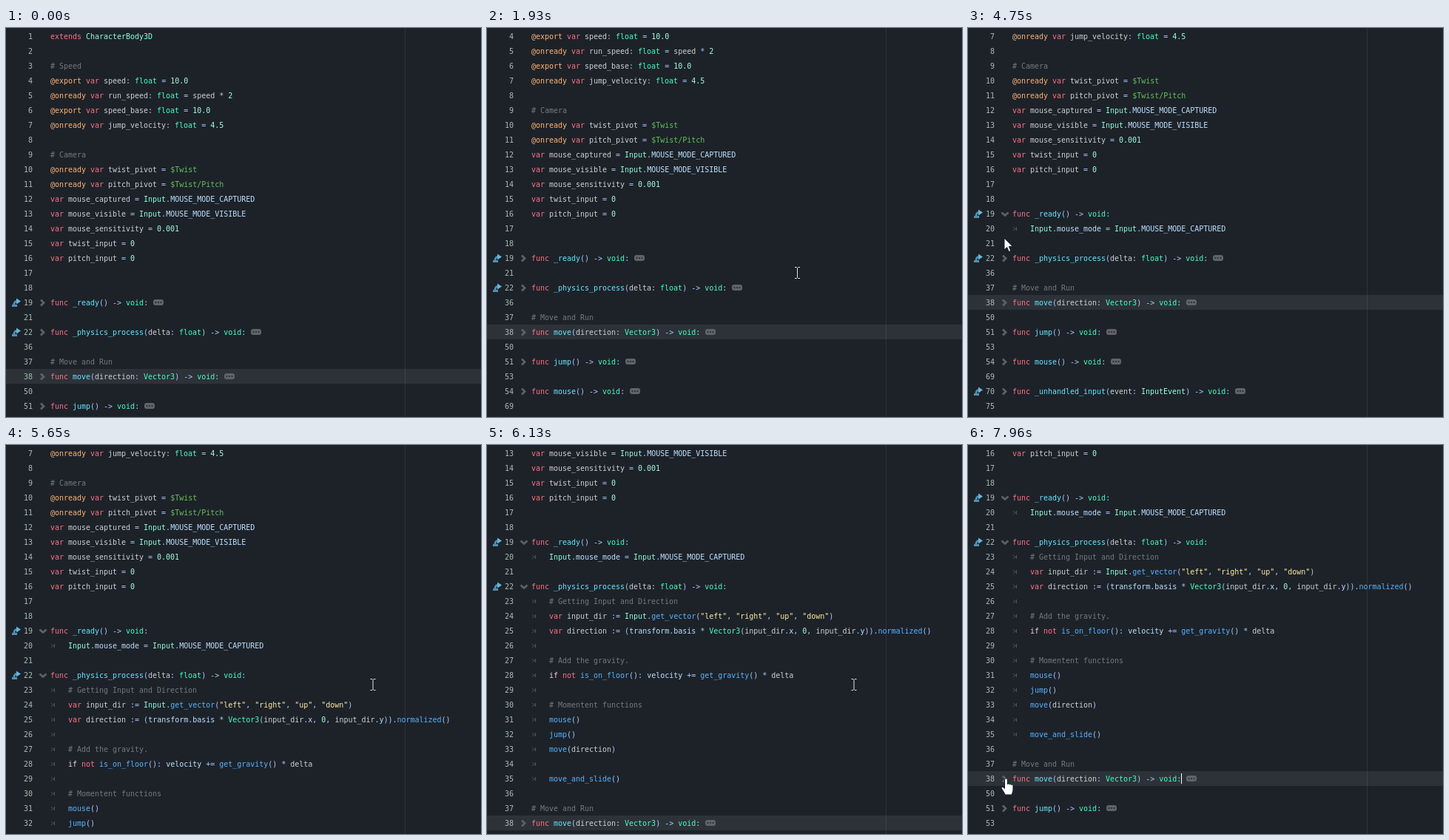
Recreate the animation shown at these times as an HTML page. Size 642 px wide and 526 px high, loop 8000 ms.

```html
<!DOCTYPE html>
<html lang="en">
<head>
<meta charset="utf-8">
<title>Code folding</title>
<style>
html, body { margin: 0; width: 100%; height: 100%; overflow: hidden; background: #1d2229; }
svg { display: block; width: 642px; height: 526px; }
text { font: 10px "DejaVu Sans Mono", "Noto Sans Mono", monospace; letter-spacing: -.02px; white-space: pre; }
path { fill: none; }
.num { fill: #a9bdb0; text-anchor: end; }
.fold { stroke: #5d6166; stroke-width: 2.8; }
.tab { stroke: #4b5057; }
.pill { fill: #606469; }
.dots { stroke: #23282f; stroke-width: 2; stroke-linecap: round; stroke-dasharray: 0 3.5; }
.link { stroke: #4f8fb3; stroke-width: 2.8; }
.head { fill: #68b4da; }
.pointer path { stroke: #14171c; fill: #fff; stroke-linejoin: round; }
.pointer .edge { stroke-width: 2.6; fill: none; }
.pointer .bar { stroke: #eee; fill: none; }
</style>
</head>
<body>
<svg viewBox="0 0 642 526">
  <rect width="642" height="526" fill="#1d2229"/>
  <path d="M539.5 0V526" stroke="#2d3239"/>
  <g id="code"></g>
  <g id="beam" class="pointer">
    <path class="edge" d="M-3.5-7.5H-1L0-6.5 1-7.5H3.5M0-6.5V6.5M-3.5 7.5H-1L0 6.5 1 7.5H3.5"/>
    <path class="bar" d="M-3.5-7.5H-1L0-6.5 1-7.5H3.5M0-6.5V6.5M-3.5 7.5H-1L0 6.5 1 7.5H3.5"/>
  </g>
  <g id="arrow" class="pointer"><path d="M0 0V16L3.7 12.6 6.2 18.4 8.8 17.3 6.4 11.6H11.4Z"/></g>
  <g id="hand" class="pointer">
    <path d="M-2 2C-2-.6 2-.6 2 2V8C2 6.5 5 6.5 5 8.3 5 6.8 7.4 7.1 7.4 8.8 7.4 7.5 9.5 7.8 9.5 9.6V15C9.5 18 8 19 8 22H-1.5C-1.5 20-5 16-6 13.5-6.7 11.5-4.4 10.7-3 12.7L-2 13.5Z"/>
  </g>
</svg>
<script>
const LOOP = 8000, ROW = 20, COL = 6, LEFT = 60, STEP = 68;

const source = `1 extends CharacterBody3D
2
3 # Speed
4 @export var speed: float = 10.0
5 @onready var run_speed: float = speed * 2
6 @export var speed_base: float = 10.0
7 @onready var jump_velocity: float = 4.5
8
9 # Camera
10 @onready var twist_pivot = $Twist
11 @onready var pitch_pivot = $Twist/Pitch
12 var mouse_captured = Input.MOUSE_MODE_CAPTURED
13 var mouse_visible = Input.MOUSE_MODE_VISIBLE
14 var mouse_sensitivity = 0.001
15 var twist_input = 0
16 var pitch_input = 0
17
18
19 func _ready() -> void:
20     Input.mouse_mode = Input.MOUSE_MODE_CAPTURED
21
22 func _physics_process(delta: float) -> void:
23     # Getting Input and Direction
24     var input_dir := Input.get_vector("left", "right", "up", "down")
25     var direction := (transform.basis * Vector3(input_dir.x, 0, input_dir.y)).normalized()
26     ${""}
27     # Add the gravity.
28     if not is_on_floor(): velocity += get_gravity() * delta
29     ${""}
30     # Momentent functions
31     mouse()
32     jump()
33     move(direction)
34     ${""}
35     move_and_slide()
36
37 # Move and Run
38 func move(direction: Vector3) -> void:
50
51 func jump() -> void:
53
54 func mouse() -> void:
69
70 func _unhandled_input(event: InputEvent) -> void:
75`;

const syntax = [
  [/#.*/, "#75797e"],
  [/"[^"]*"/, "#ffeda1"],
  [/@\w+/, "#ffb373"],
  [/\$[\w/]+/, "#63c259"],
  [/\b\d[\d.]*/, "#a1ffe0"],
  [/\b(?:extends|var|func|not)\b/, "#ff7085"],
  [/\bif\b/, "#f0cfd0"],
  [/\b(?:float|void|Vector3)\b/, "#42ffc2"],
  [/\b(?:CharacterBody3D|InputEvent|Input)\b/, "#8fffdb"],
  [/(?<=func )\w+/, "#66e6ff"],
  [/\b\w+(?=\()/, "#57b3ff"],
  [/(?<=\.)\w+|\b(?:transform|velocity)\b/, "#bce0ff"],
  [/\w+/, "#cdcfd2"],
  [/[^\w\s"#@$]+/, "#abc9ff"]
];
const lexer = new RegExp(syntax.map(([re]) => `(${re.source})`).join("|"), "g");

// When a clicked function unfolds
const opens = { 19: 3820, 22: 5090 };
const wheel = [
  { at: 1860, lines: 3, steps: 2 },
  { at: 2200, lines: 2, steps: 1 },
  { at: 4410, lines: 1, steps: 1 },
  { at: 5920, lines: 9, steps: 6 }
];
const entry = { at: 990, x: 517, y: 458 };
const moves = [
  { from: 990, to: 1660, x: 419.5, y: 331 },
  { from: 2860, to: 3430, x: 51.5, y: 268 },
  { from: 3620, to: 3760, x: 51.5, y: 271 },
  { from: 4480, to: 4750, x: 49, y: 284 },
  { from: 4750, to: 4950, x: 51.5, y: 311 },
  { from: 5160, to: 5650, x: 496, y: 324 },
  { from: 6660, to: 7480, x: 69, y: 432 },
  { from: 7480, to: 7960, x: 51.5, y: 451 }
];
const blink = { from: 4160, half: 585 };

const $ = id => document.getElementById(id);
function add(parent, tag, attrs, text) {
  const el = document.createElementNS("http://www.w3.org/2000/svg", tag);
  for (const key in attrs) el.setAttribute(key, attrs[key]);
  if (text !== undefined) el.textContent = text;
  return parent.appendChild(el);
}
const show = (el, on) => el.setAttribute("visibility", on ? "inherit" : "hidden");
const place = (el, x, y) => el.setAttribute("transform", `translate(${x} ${y})`);
const clamp = p => Math.max(0, Math.min(1, p));

function highlight(g, code) {
  const text = add(g, "text", { x: LEFT, y: 15 });
  let end = 0;
  for (const m of code.matchAll(lexer)) {
    if (m.index > end) text.append(code.slice(end, m.index));
    const rule = m.slice(1).findIndex(s => s !== undefined);
    add(text, "tspan", { fill: syntax[rule][1] }, m[0]);
    end = m.index + m[0].length;
  }
}

let caret, opened = 0;
function makeRow(line) {
  const [, num, code] = line.match(/^(\d+) ?(.*)$/);
  const g = add($("code"), "g", {});
  const row = { g, opensAt: opens[num] ?? Infinity, from: 0 };
  const end = LEFT + code.length * COL;
  const current = num === "38";
  if (current) add(g, "rect", { y: 1, width: 642, height: ROW, fill: "#fff", opacity: .07 });
  add(g, "text", { x: 36, y: 15, class: "num" }, num);
  if (code.startsWith("    ")) {
    row.from = opened;
    add(g, "path", { d: "M61 9L63.3 11.5 61 14M65.5 9V14M66 9L64 11.5 66 14", class: "tab" });
  }
  if (code.startsWith("func")) {
    opened = row.opensAt;
    row.closed = add(g, "g", {});
    add(row.closed, "path", { d: "M47 7.5L51 11.5 47 15.5", class: "fold" });
    add(row.closed, "rect", { x: end + 7, y: 7, width: 14, height: 8, rx: 3, class: "pill" });
    add(row.closed, "path", { d: `M${end + 10.5} 11h7.1`, class: "dots" });
    row.open = add(g, "path", { d: "M45.5 9.5L50 13.5 54.5 9.5", class: "fold" });
  }
  if (code.startsWith("func _")) {
    add(g, "path", { d: "M8 15.5H15M11 15.5Q10.5 9.5 15 9.5", class: "link" });
    add(g, "path", { d: "M14 5.5L20 9.5 14 13.5Z", class: "head" });
  }
  highlight(g, code);
  if (current) caret = add(g, "rect", { x: end, y: 4, width: 1, height: 14, fill: "#fff" });
  return row;
}
const rows = source.split("\n").map(makeRow);

function scrolled(t) {
  return wheel.reduce((sum, { at, lines, steps }) => {
    const done = Math.floor((t - at) / STEP) + 1;
    return sum + lines * clamp(done / steps);
  }, 0);
}

function pointerAt(t) {
  let { x, y } = entry;
  for (const m of moves) {
    const n = Math.round((m.to - m.from) / STEP);
    const p = Math.floor(n * clamp((t - m.from) / (m.to - m.from)) + 1e-6) / n;
    const ease = (1 - Math.cos(Math.PI * p)) / 2;
    x += (m.x - x) * ease;
    y += (m.y - y) * ease;
  }
  return { x, y };
}

function draw(t) {
  const top = scrolled(t);
  const visible = rows.filter(row => t >= row.from);
  for (const row of rows) {
    show(row.g, t >= row.from);
    if (!row.closed) continue;
    show(row.closed, t < row.opensAt);
    show(row.open, t >= row.opensAt);
  }
  visible.forEach((row, i) => place(row.g, 0, (i - top) * ROW));

  const age = t - blink.from;
  show(caret, age >= 0 && age % (2 * blink.half) < blink.half);

  // Beam over text, hand over a fold mark, arrow over the rest of the gutter
  const { x, y } = pointerAt(t);
  const hovered = visible[Math.floor((y - 1) / ROW + top)];
  const shape = x > LEFT ? "beam" : hovered?.closed ? "hand" : "arrow";
  for (const id of ["beam", "arrow", "hand"]) show($(id), t >= entry.at && id === shape);
  place($(shape), x, y);
}

const begin = performance.now();
function tick() {
  draw((performance.now() - begin) % LOOP);
  requestAnimationFrame(tick);
}
tick();
</script>
</body>
</html>
```
